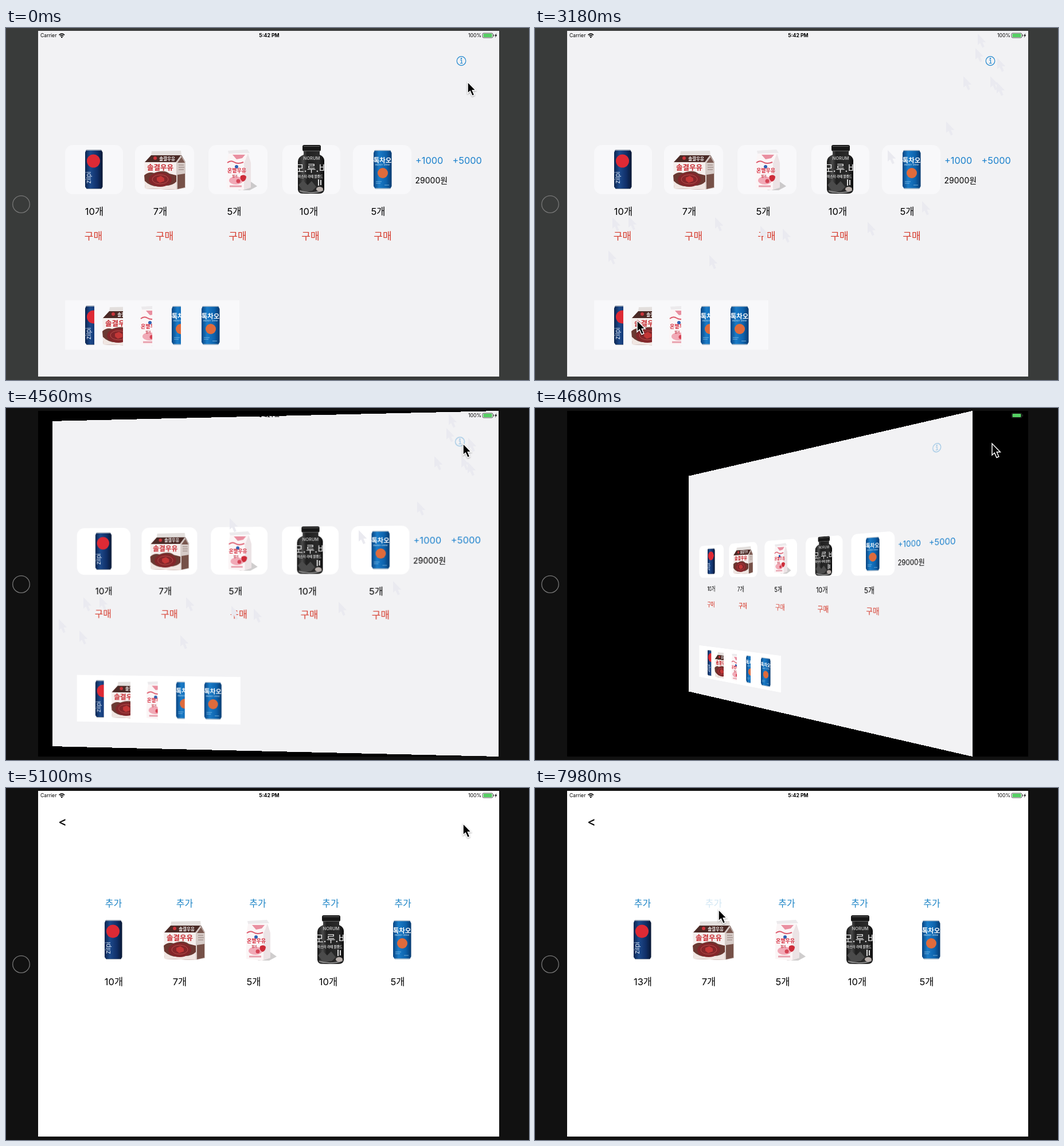
An HTML page for the animation above (8 s loop, 912 by 614 pixels).

```html
<!DOCTYPE html>
<html lang="ko">
<head>
<meta charset="utf-8">
<title>Vending machine</title>
<style>
  html, body { margin: 0; width: 100%; height: 100%; overflow: hidden; background: #393b3a; }
  #stage { position: relative; width: 912px; height: 614px; overflow: hidden; background: #393b3a; }
  #stage.flipped { background: #111; }
  #screen { position: absolute; left: 56px; top: 5px; width: 804px; height: 603px;
            background: #000; overflow: hidden; perspective: 868px; }
  .page { position: absolute; inset: 0; backface-visibility: hidden; }
  .page svg, #overlay { position: absolute; left: 0; top: 0; display: block; }
  #shop { background: #f2f2f4; }
  #admin { background: #fff; }
  .cell { fill: #f8f8fa; }
  .flipped .cell { fill: #fff; }
  text { font-family: Inter, "Noto Sans CJK KR", "Noto Sans CJK JP", "Noto Sans CJK", sans-serif; }
  .mid { text-anchor: middle; }
  .count { font-size: 16.5px; }
  .buy { font-size: 17px; fill: #d5382a; }
  .add { font-size: 16px; fill: #1c84c6; }
  .money { font-size: 16.3px; fill: #1a80cc; }
  .bar { font-size: 8.7px; }
</style>
</head>
<body>
<div id="stage">
  <div id="screen">
    <div class="page" id="shop"></div>
    <div class="page" id="admin"></div>
  </div>
  <svg id="overlay" width="912" height="614">
    <defs>
      <linearGradient id="navy">
        <stop offset="0" stop-color="#0c2550"/><stop offset=".3" stop-color="#1d4a8c"/>
        <stop offset=".7" stop-color="#102f68"/><stop offset="1" stop-color="#081733"/>
      </linearGradient>
      <linearGradient id="azure">
        <stop offset="0" stop-color="#0a4582"/><stop offset=".3" stop-color="#1a7cc8"/>
        <stop offset=".7" stop-color="#0d62ac"/><stop offset="1" stop-color="#073a70"/>
      </linearGradient>
      <linearGradient id="glass">
        <stop offset="0" stop-color="#151515"/><stop offset=".2" stop-color="#4a4a4a"/>
        <stop offset=".35" stop-color="#202020"/><stop offset=".8" stop-color="#2b2b2b"/>
        <stop offset="1" stop-color="#0c0c0c"/>
      </linearGradient>

      <g id="cola">
        <path d="M140 212.5H166L168.500 217V277L166 281H141L138 277V217Z" fill="url(#navy)"/>
        <path d="M140 213H166" stroke="#aeb4bc" stroke-width="1.5"/>
        <path d="M141 280.500H166" stroke="#8d949d"/>
        <circle cx="152.500" cy="232" r="11.500" fill="#de2a35"/>
        <text transform="translate(147.500 271.500) rotate(-90)" font-size="11" fill="#dfe8f5">zilpi</text>
      </g>

      <g id="choco">
        <path d="M254 215L305 214L306 222H253Z" fill="#e3dfdd"/>
        <path d="M253 222H306L313 234H242Z" fill="#4b2a26"/>
        <path d="M296 234L305 222L313 234V279L296 282Z" fill="#d6cbc7"/>
        <path d="M299 235L306 225L312 235Z" fill="#7a5850"/>
        <path d="M241 234H297V282L243 280Z" fill="#f5efed"/>
        <path d="M241 257Q249 250 258 253Q276 246 285 254L297 257V282L243 280Z" fill="#6b3932"/>
        <path d="M241 266Q255 280 274 275Q290 276 297 268V282L243 280Z" fill="#f0e6e2"/>
        <ellipse cx="269" cy="264.500" rx="20" ry="12.500" fill="#83262a"/>
        <ellipse cx="269" cy="264" rx="14" ry="8" fill="none" stroke="#b7504c"/>
        <path d="M263 261L270 258L276 262V267L268 270L263 266Z" fill="#c33737"/>
        <path d="M299 256L312 254V278L299 281Z" fill="#765148"/>
        <path d="M301 239H310M301 243H311M301 247H310" stroke="#8f7b76"/>
        <text class="mid" x="269" y="247.500" font-size="12.500" font-weight="800" fill="#c82a31">솔결우유</text>
        <text class="mid" x="281" y="230.500" font-size="7.500" font-weight="700" fill="#fff">솔결우유</text>
        <circle cx="260" cy="227" r="3" fill="#c9343a"/>
      </g>

      <g id="berry">
        <path d="M424 266L438 276L425 283H405Z" fill="#77706f" opacity=".35"/>
        <path d="M387 214L421 212L425 218L388 219Z" fill="#eceaec"/>
        <path d="M388 219H422L427 235V278L412 283L385 280V236Z" fill="#fbf5f6"/>
        <path d="M415 236L422 219L427 235V278L415 282Z" fill="#ece3e5"/>
        <path d="M395 221H417L412 227L402 229Z" fill="#e98fa0"/>
        <path d="M386 235Q392 230 398 234T414 234" fill="none" stroke="#dc5a6c" stroke-width="2"/>
        <circle cx="402" cy="242" r="3" fill="#2d61b3"/>
        <text class="mid" x="402.500" y="251.500" font-size="9" font-weight="800" fill="#d62b3c">온볕우유</text>
        <ellipse cx="401" cy="266" rx="12" ry="7" fill="#f1a9b6"/>
        <path d="M390 276H411" stroke="#e8a0ad" stroke-width="3"/>
        <path d="M409 258Q415 254 419 259Q419 266 413 268Q407 264 409 258Z" fill="#cd2c39"/>
        <circle cx="405" cy="267" r="3.500" fill="#d64455"/>
        <text class="mid" x="399" y="259.500" font-size="5" font-weight="700" fill="#c43a4a">딸기</text>
      </g>

      <g id="coffee">
        <path d="M519 214H547V221Q556 225 555 233V282Q554 289 546 289H517Q510 289 509 282V233Q509 225 519 221Z" fill="url(#glass)"/>
        <rect x="517" y="204" width="32" height="11" rx="3" fill="#171717"/>
        <path d="M519 206.500H547M519 214.500H547" stroke="#777" stroke-width=".8"/>
        <text class="mid" x="533" y="230" font-size="7.500" font-weight="600" fill="#bbb">NORUM</text>
        <text class="mid" x="532.500" y="251" font-size="17" font-weight="500" fill="#eee">모.루.비</text>
        <text class="mid" x="531" y="260.500" font-size="5.500" font-weight="600" fill="#ddd">마스터 라떼 블렌드</text>
        <path d="M510 274L518 266L526 274L533 267L541 277L534 284L520 286Z" fill="#4b4b4b"/>
        <path d="M512 284Q532 291 553 283" fill="none" stroke="#8b8b8b" stroke-width="2"/>
        <path d="M545 264V275M549 265V274" stroke="#ddd" stroke-width="2"/>
        <ellipse cx="547" cy="281" rx="6" ry="4" fill="#b9b0ac"/>
      </g>

      <g id="energy">
        <path d="M643 213H670L672.500 218V276L670 280.500H644L641 276V218Z" fill="url(#azure)"/>
        <path d="M643 213.500H670M644 280H670" stroke="#b3c0cc" stroke-width="1.500"/>
        <text class="mid" x="656.500" y="234.500" font-size="11.500" font-weight="800" fill="#fff">톡차오</text>
        <text class="mid" x="656.500" y="240" font-size="3.500" fill="#d6e9f6">ENERGY DRINK</text>
        <circle cx="657" cy="253" r="9" fill="#df6b3c"/>
        <path d="M645 268H655M645 271H653M660 274H668" stroke="#8fc0e4" stroke-width=".8"/>
      </g>

      <path id="arrow" d="M0 0V20L4.300 16.300L8 24.500L11.800 22.800L8.300 14.800H14.300Z"/>
    </defs>

    <g id="trail" fill="#eaeaf0"></g>
    <g id="status">
      <text class="bar" x="60" y="16">Carrier</text>
      <g fill="none" stroke="#000" stroke-width="1.500">
        <path d="M92.500 12.200Q97.300 8 102.100 12.200M94.400 14.300Q97.300 11.800 100.200 14.300"/>
      </g>
      <circle cx="97.300" cy="16" r="1.300"/>
      <text class="bar mid" x="459" y="16.200" font-weight="700">5:42 PM</text>
      <text class="bar" x="829" y="16" text-anchor="end">100%</text>
      <rect x="831" y="9" width="18" height="8" rx="2" fill="none" stroke="#333" stroke-width=".8"/>
      <rect x="832.500" y="10" width="15" height="6" rx="1" fill="#55cf63"/>
      <path d="M850.500 11.500V14.500" stroke="#333"/>
      <path d="M855.500 9L852 13.500H854L852.800 17L856.300 12.300H854.300Z"/>
    </g>
    <circle cx="26.500" cy="307.500" r="14.800" fill="none" stroke="#777" stroke-width="1.300"/>
    <use id="cursor" href="#arrow" stroke="#fff" stroke-width="1.500" style="filter:drop-shadow(0 1px 1px rgba(0,0,0,.35))"/>
  </svg>
</div>
<script>
const LOOP = 8000, STEP = 60;
const FLIP = { start: 4509, length: 542 };
const HALF_WIDTH = 402;
const ADD_TIMES = [6420, 6780, 7140];

// drink: id, cell left, cell width, count centre, button centre, stock
const drinks = [
  ['cola', 103, 101, 154, 152.5, 10],
  ['choco', 225, 103, 269, 276.5, 7],
  ['berry', 353, 103, 398, 404, 5],
  ['coffee', 482, 101, 528, 531, 10],
  ['energy', 605, 102, 649, 657, 5]
];

// bought drink: id, left edge of the drink, visible width, place in the strip
const bought = [
  ['cola', 138, 16, 138],
  ['choco', 241, 36, 168],
  ['berry', 383, 23, 232],
  ['energy', 641, 16, 289],
  ['energy', 640, 33, 340]
];

// pointer: time, x, y, whether it leaves a faint mark
const path = [
  [0, 805, 94], [720, 805, 94, 1], [960, 806, 52, 1], [1200, 794, 84, 1], [1440, 747, 84, 1],
  [1740, 304, 396, 1], [1920, 147, 494], [2040, 147, 494], [2160, 128, 388, 1],
  [2220, 135, 330, 1], [2340, 314, 330, 1], [2460, 580, 338, 1], [2520, 675, 302, 1],
  [2580, 717, 163, 1], [2700, 768, 35, 1], [2760, 772, 10, 1], [2880, 615, 213, 1],
  [2940, 432, 350, 1], [3000, 393, 345, 1], [3060, 163, 328, 1], [3180, 178, 510],
  [3480, 178, 510], [3660, 92, 368, 1], [3900, 390, 192, 1], [4200, 797, 62],
  [5340, 797, 62], [5940, 188, 217], [7320, 188, 217], [7680, 320, 212], [LOOP, 320, 212]
];

const $ = id => document.getElementById(id);
const label = (cls, x, y, s, id = '') => `<text ${id && `id="${id}"`} class="${cls}" x="${x}" y="${y}">${s}</text>`;
const sheet = body => `<svg width="804" height="603" viewBox="56 5 804 603">${body}</svg>`;
const crop = ([id, from, width, x]) =>
  `<svg x="${x}" y="483" width="${width}" height="74" viewBox="${from} 211 ${width} 74"><use href="#${id}"/></svg>`;

function shopPage() {
  const cells = drinks.map(([id, x, w, cx, bx, n]) =>
    `<rect class="cell" x="${x}" y="204" width="${w}" height="86" rx="14"/><use href="#${id}"/>` +
    label('mid count', cx, 326, n + '개') + label('mid buy', bx, 368.5, '구매'));
  return sheet(cells.join('') +
    `<g id="info" fill="none" stroke="#2389cf" stroke-width="1.200"><circle cx="794" cy="57.500" r="7.800"/>
     <path d="M792 56H794.500V61.500M791.800 61.500H796.500" /><circle cx="794" cy="53.300" r=".7"/></g>` +
    label('money', 714, 236.5, '+1000') + label('money', 778.5, 236.5, '+5000') +
    `<text x="713.500" y="271" font-size="14">29000원</text>` +
    `<rect class="cell" x="103" y="475" width="304" height="86"/>` + bought.map(crop).join(''));
}

function adminPage() {
  const items = drinks.map(([id, , , cx, bx, n], i) =>
    `<use href="#${id}" x="34" y="18"/>` +
    label('mid add', bx + 35, 207, '추가', 'add' + i) + label('mid count', cx + 34, 344, n + '개', 'stock' + i));
  return sheet(items.join('') + `<text class="mid" x="98.500" y="65.500" font-size="22" font-weight="500">&lt;</text>`);
}

function pointerAt(t) {
  const i = path.findIndex(p => p[0] > t);
  const [t0, x0, y0] = path[i - 1], [t1, x1, y1] = path[i];
  const k = (t - t0) / (t1 - t0);
  return [x0 + (x1 - x0) * k, y0 + (y1 - y0) * k];
}

// The near edge stays in the plane of the screen while the page turns.
function turn(page, degrees, depth) {
  page.style.transform = degrees ? `translateZ(${-depth}px) rotateY(${degrees}deg)` : 'none';
}

$('shop').innerHTML = shopPage();
$('admin').innerHTML = adminPage();
const marks = path.filter(p => p[3]);
$('trail').innerHTML = marks.map(([, x, y]) => `<use href="#arrow" x="${x}" y="${y}"/>`).join('');
const markNodes = [...$('trail').children];

function draw(t) {
  const k = Math.min(1, Math.max(0, (t - FLIP.start) / FLIP.length));
  const angle = 90 * (1 - Math.cos(Math.PI * k));
  const depth = HALF_WIDTH * Math.sin(angle * Math.PI / 180);
  turn($('shop'), -angle, depth);
  turn($('admin'), 180 - angle, depth);
  $('shop').style.visibility = angle < 90 ? 'visible' : 'hidden';
  $('admin').style.visibility = angle < 90 ? 'hidden' : 'visible';
  $('stage').classList.toggle('flipped', k > 0);

  $('info').style.opacity = t >= 4380 ? .45 : 1;
  $('trail').style.display = t < 4620 ? '' : 'none';
  markNodes.forEach((node, i) => node.style.display = t > marks[i][0] + STEP ? '' : 'none');

  $('stock0').textContent = 10 + ADD_TIMES.filter(a => t >= a).length + '개';
  $('add0').style.opacity = ADD_TIMES.some(a => t >= a - 120 && t < a) ? .2 : 1;
  $('add1').style.opacity = t >= 7860 ? .2 : 1;

  const [x, y] = pointerAt(t);
  $('cursor').setAttribute('transform', `translate(${x} ${y})`);
}

const begin = performance.now();
function tick() {
  const t = (performance.now() - begin) % LOOP;
  draw(Math.floor(t / STEP) * STEP);
  requestAnimationFrame(tick);
}
tick();
</script>
</body>
</html>
```
